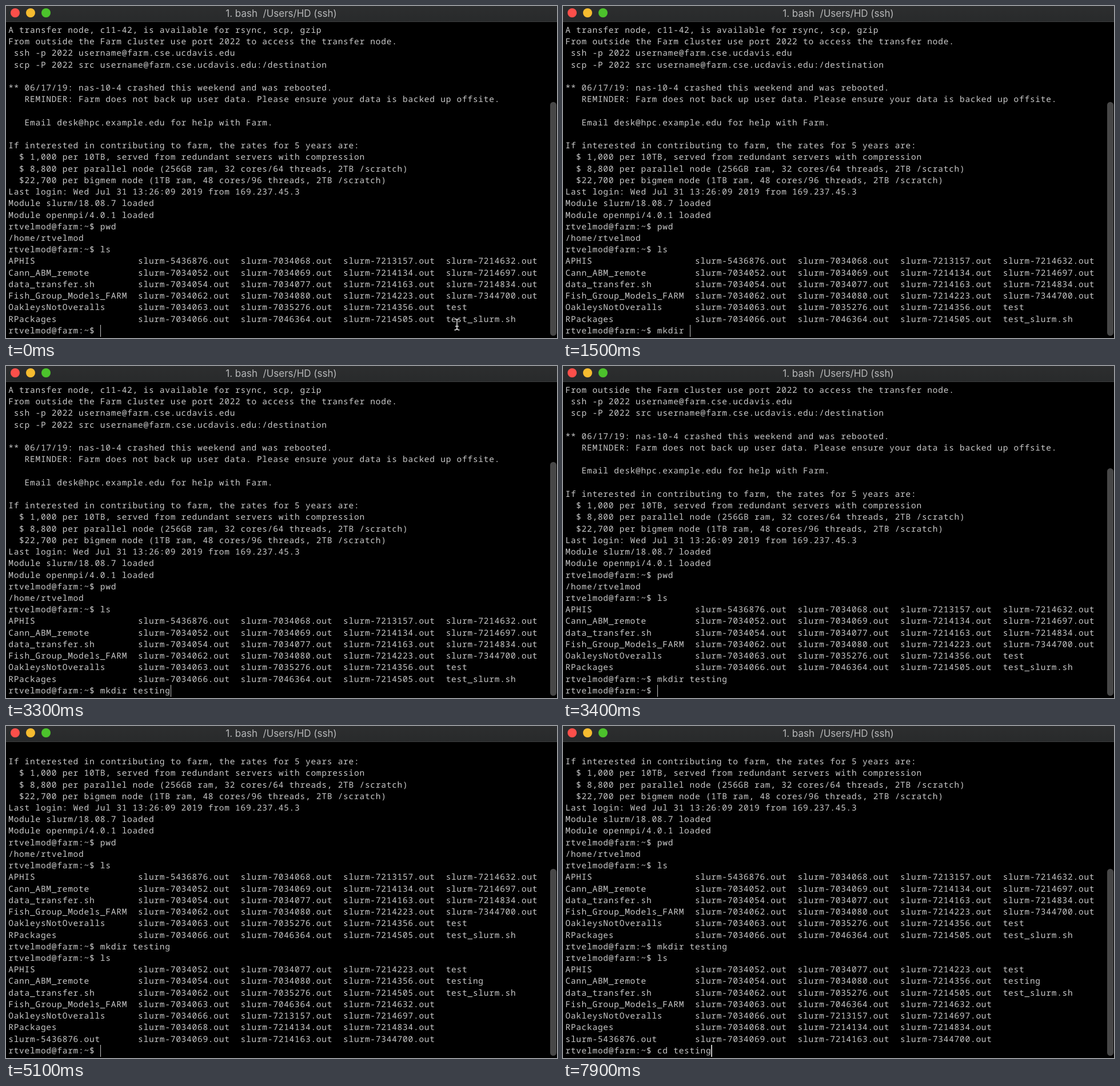
Write an HTML page that moves like this. It is 964 by 581 pixels and loops after 8000 ms.

```html
<!DOCTYPE html>
<html lang="en">
<head>
<meta charset="utf-8">
<title>Terminal</title>
<style>
html, body { margin: 0; width: 100%; height: 100%; overflow: hidden; background: #000; }
#stage { position: relative; width: 964px; height: 581px; overflow: hidden; background: #000; }
#bar {
  position: absolute; left: 0; top: 0; width: 964px; height: 28px;
  background: linear-gradient(#2d2e2f, #282a2b); border-bottom: 1px solid #3c3e3f;
  box-sizing: border-box;
}
#bar i { position: absolute; top: 4.3px; width: 16px; height: 16px; border-radius: 50%; }
#name {
  position: absolute; left: 0; width: 963px; top: 0; text-align: center;
  white-space: pre; color: #b6b7b8; font: 17px/26px Inter, sans-serif;
}
#screen {
  position: absolute; left: 4.2px; top: 31.8px; margin: 0; color: #c9c9c9;
  font: 14.5px/20.24px "Noto Sans Mono", monospace; letter-spacing: calc(9.45px - .6em);
  text-rendering: geometricPrecision; font-variant-ligatures: none;
}
#caret { position: relative; }
#caret::after {
  content: ""; position: absolute; left: 0; bottom: -1px; width: 1.5px; height: 21px; background: #c4c4c4;
}
#thumb { position: absolute; left: 952px; bottom: 4px; width: 10.5px; border-radius: 5.25px; background: #474747; }
#mouse { position: absolute; left: 780px; top: 544px; }
</style>
</head>
<body>
<div id="stage">
  <div id="bar">
    <i style="left:8px;background:#fc4f4a"></i>
    <i style="left:35px;background:#f6bc30"></i>
    <i style="left:62px;background:#4cc22c"></i>
    <div id="name">1. bash  /Users/HD (ssh)</div>
  </div>
  <pre id="screen"><span id="text"></span><span id="caret"></span></pre>
  <div id="thumb"></div>
  <svg id="mouse" width="18" height="26" fill="none" stroke-linecap="round">
    <defs>
      <path id="beam" d="M5 3.5Q9 3.5 9 7V19.5Q9 23 5 23M13 3.5Q9 3.5 9 7M9 19.5Q9 23 13 23M6.5 16.5H11.5"/>
    </defs>
    <use href="#beam" stroke="#000" stroke-width="3.5"/>
    <use href="#beam" stroke="#e4e4e4" stroke-width="1.5"/>
  </svg>
</div>
<script>
const LOOP = 8000, ROWS = 27, HISTORY = 36;
const $ = id => document.getElementById(id);
const user = 'rtvelmod', prompt = user + '@farm:~$ ';

const dirs = ['APHIS', 'Cann_ABM_remote', 'data_transfer.sh', 'Fish_Group_Models_FARM', 'OakleysNotOveralls', 'RPackages'];
const jobs = ('5436876 7034052 7034054 7034062 7034063 7034066 7034068 7034069 7034077 7034080 7035276 7046364 ' +
  '7213157 7214134 7214163 7214223 7214356 7214505 7214632 7214697 7214834 7344700')
  .split(' ').map(n => `slurm-${n}.out`);

// Column-major listing, as printed by ls.
function list(rows, ...tail) {
  const files = [...dirs, ...jobs, ...tail];
  return Array.from({ length: rows }, (_, r) =>
    files.filter((_, i) => i % rows === r).map((f, c) => f.padEnd(c ? 19 : 24)).join('').trimEnd());
}

const intro = `A transfer node, c11-42, is available for rsync, scp, gzip
From outside the Farm cluster use port 2022 to access the transfer node.
 ssh -p 2022 username@farm.cse.ucdavis.edu
 scp -P 2022 src username@farm.cse.ucdavis.edu:/destination

** 06/17/19: nas-10-4 crashed this weekend and was rebooted.
   REMINDER: Farm does not back up user data. Please ensure your data is backed up offsite.

   Email desk@hpc.example.edu for help with Farm.

If interested in contributing to farm, the rates for 5 years are:
  $ 1,000 per 10TB, served from redundant servers with compression
  $ 8,800 per parallel node (256GB ram, 32 cores/64 threads, 2TB /scratch)
  $22,700 per bigmem node (1TB ram, 48 cores/96 threads, 2TB /scratch)
Last login: Wed Jul 31 13:26:09 2019 from 169.237.45.3
Module slurm/18.08.7 loaded
Module openmpi/4.0.1 loaded
${prompt}pwd
/home/${user}
${prompt}ls`.split('\n').concat(list(6, 'test', 'test_slurm.sh'));

// Each command: key press times, time of Enter, printed output.
const commands = [
  { text: 'mkdir testing', keys: [500, 700, 900, 1100, 1200, 1400, 1700, 1900, 2100, 2300, 2500, 2700, 2900], enter: 3400, out: [] },
  { text: 'ls', keys: [4200, 4600], enter: 5100, out: list(7, 'test', 'testing', 'test_slurm.sh') },
  { text: 'cd testing', keys: [5900, 6400, 6600, 6800, 7000, 7200, 7400, 7500, 7700, 7900], enter: LOOP, out: [] }
];

let shown = '';
function render(t) {
  const lines = [...intro];
  for (const { text, keys, enter, out } of commands) {
    lines.push(prompt + text.slice(0, keys.filter(k => k <= t).length));
    if (t < enter) break;
    lines.push(...out);
  }
  const text = lines.slice(-ROWS).join('\n');
  if (text === shown) return;
  shown = text;
  $('text').textContent = text;
  $('thumb').style.height = 545 * ROWS / (HISTORY + lines.length - ROWS) + 'px';
  $('mouse').style.display = t < commands[0].keys[0] ? '' : 'none';
}

const start = performance.now();
function tick() {
  render((performance.now() - start) % LOOP);
  requestAnimationFrame(tick);
}
tick();
</script>
</body>
</html>
```
